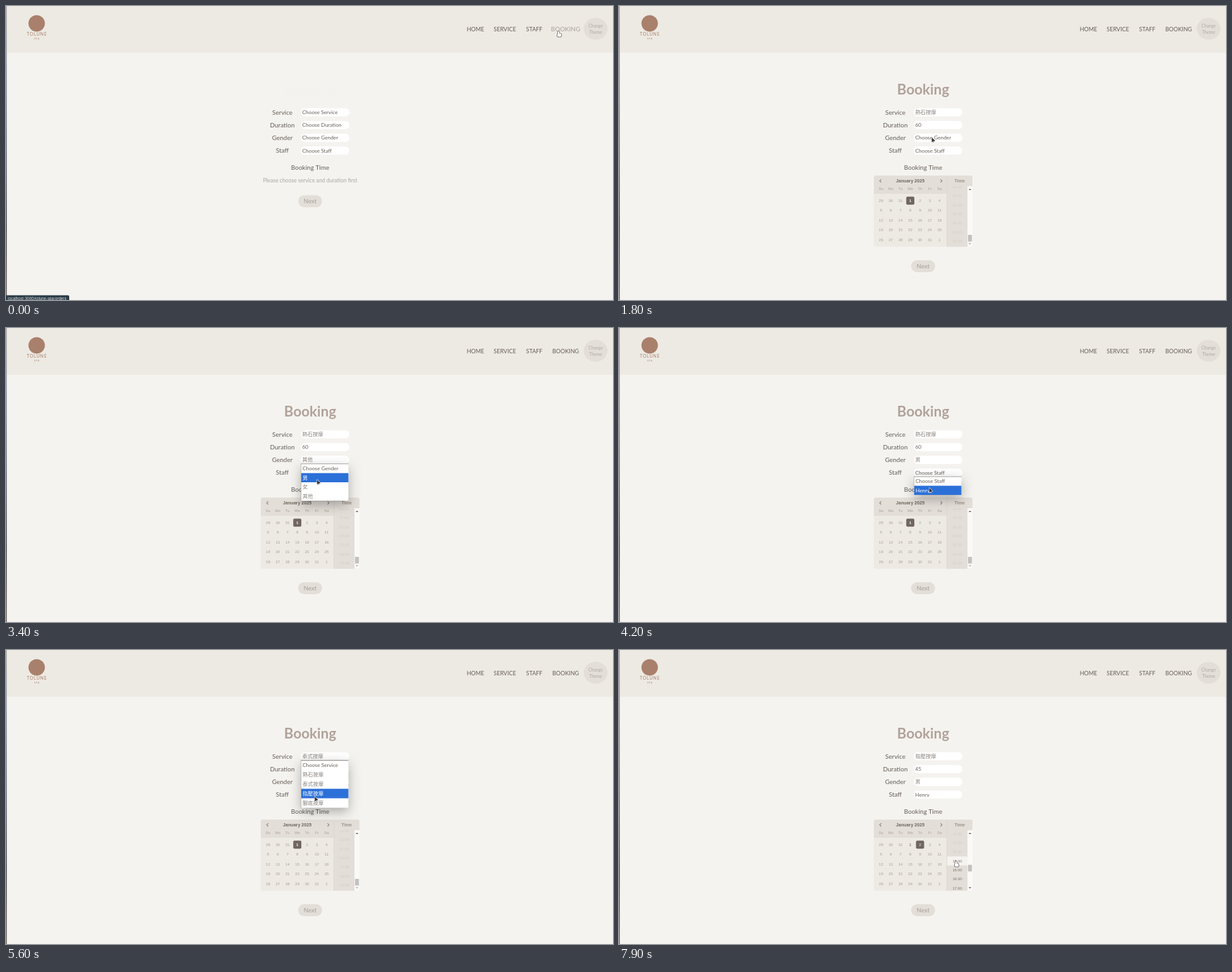
Write an HTML page with a canvas that moves like this. It is 960x465 px and loops after 8000 ms.

```html
<!DOCTYPE html>
<html lang="en">
<head>
<meta charset="utf-8">
<title>Booking</title>
<style>
html, body { margin: 0; width: 960px; height: 465px; overflow: hidden; background: #f5f3ef; }
canvas { display: block; }
</style>
</head>
<body>
<canvas id="stage" width="960" height="465"></canvas>
<script>
const ctx = document.getElementById('stage').getContext('2d');
const LOOP = 8000, TICK = 100, DATE_PICKED = 7100;
const UI = 'Lato, "Noto Sans CJK TC", "Noto Sans CJK JP", "Noto Sans CJK", sans-serif';
const CAL = '"Liberation Sans", Arial, sans-serif';
const PAGE = '#f5f3ef', BAND = '#edeae3', SAND = '#e3ded8', INK = '#655d57', BROWN = '#a9806c';
const MENU = { x: 467, w: 74.5 }, TIME_ROW = 14.35;

const names = ['Service', 'Duration', 'Gender', 'Staff'];
const fieldY = name => 168 + 20.2 * names.indexOf(name);
const rowHeight = name => name === 'Service' ? 15 : 14.5;
const menuTop = name => fieldY(name) + 6.5;
const dayX = col => 414.4 + 15.43 * col;
const dayY = row => 307.8 + 15.4 * row;

const services = ['熱石按摩', '泰式按摩', '指壓按摩', '腳底按摩'];
const durations = service => service === 3 ? ['45', '75', '90'] : ['60', '90', '120'];

// Each visit opens a menu and moves from one row to the row it picks.
const visits = [
  { name: 'Service', open: 400, close: 700, from: 0, pick: 1 },
  { name: 'Duration', open: 1000, close: 1400, from: 0, pick: 1 },
  { name: 'Gender', open: 1900, close: 2500, from: 0, pick: 3 },
  { name: 'Gender', open: 2900, close: 3700, from: 3, pick: 1 },
  { name: 'Staff', open: 4000, close: 4400, from: 0, pick: 1 },
  { name: 'Service', open: 4900, close: 5200, from: 1, pick: 2 },
  { name: 'Service', open: 5400, close: 5700, from: 2, pick: 3 },
  { name: 'Duration', open: 5900, close: 6400, from: 0, pick: 1 }
];

const clamp = (v, lo, hi) => Math.min(hi, Math.max(lo, v));
const ease = p => p * p * (3 - 2 * p);
const progress = (t, from, to) => ease(clamp((t - from) / (to - from), 0, 1));

function visitKeys({ name, open, close, from, pick }) {
  const overshoot = 0.35 * Math.sign(pick - from);
  const key = (t, y) => ({ t, x: 498 - t / 600, y });
  const rowY = row => menuTop(name) + rowHeight(name) * (row + 0.5);
  return [
    key(open - 100, fieldY(name)),
    key(open + 50, rowY(from - overshoot)),
    key(close - 100, rowY(pick + overshoot))
  ];
}

const path = [
  { t: 0, x: 874, y: 40 },
  { t: 100, x: 870, y: 44 },
  ...visits.flatMap(visitKeys),
  { t: 2700, x: 496, y: fieldY('Staff') - 3 },
  { t: 6500, x: 506, y: fieldY('Gender') },
  { t: 6700, x: 578, y: 262 },
  { t: 7000, x: dayX(4), y: dayY(0) - 2 },
  { t: DATE_PICKED, x: dayX(4), y: dayY(0) - 2 },
  { t: 7500, x: 533, y: 334 }
].sort((a, b) => a.t - b.t);

function pointerAt(t) {
  const next = path.findIndex(k => k.t > t);
  if (next < 0) return path[path.length - 1];
  const a = path[next - 1], b = path[next], p = progress(t, a.t, b.t);
  return { x: a.x + (b.x - a.x) * p, y: a.y + (b.y - a.y) * p };
}

function formAt(t) {
  const form = { Service: 0, Duration: 0, Gender: 0, Staff: 0 };
  for (const { name, close, pick } of visits) {
    if (close > t) break;
    if (name === 'Service' && String(durations(pick)) !== String(durations(form.Service))) form.Duration = 0;
    form[name] = pick;
  }
  return form;
}

function optionsOf(name, form) {
  const lists = { Service: services, Duration: durations(form.Service), Gender: ['男', '女', '其他'], Staff: ['Henry'] };
  return ['Choose ' + name, ...lists[name]];
}

function rect(x, y, w, h, color, radius = 0) {
  ctx.fillStyle = color;
  ctx.beginPath();
  ctx.roundRect(x, y, w, h, radius);
  ctx.fill();
}

function oval(x, y, rx, ry, color) {
  ctx.fillStyle = color;
  ctx.beginPath();
  ctx.ellipse(x, y, rx, ry, 0, 0, 7);
  ctx.fill();
}

// y is the middle of the capitals
function text(str, x, y, size, color, { align = 'center', weight = 400, family = UI } = {}) {
  ctx.font = `${weight} ${size}px ${family}`;
  ctx.textAlign = align;
  ctx.fillStyle = color;
  ctx.fillText(str, x, y + size * 0.36);
}

const optionText = (str, x, y, color) =>
  text(str, x, y, 8.3, color || (/\w/.test(str) ? INK : '#89837e'), { align: 'left' });

// Arrow tip of half-size s; dir is the direction along one axis
function chevron(x, y, s, dx, dy) {
  ctx.beginPath();
  ctx.moveTo(x - s * (dx + dy) / 2, y - s * (dy + dx) / 2 * 1 - (dx ? s * (1 - dx / 2) - s * 0.5 * dx * 0 - s * 0.0 : 0) + (dx ? s * 0 : 0));
}

function angle(x, y, size, turn) {
  ctx.save();
  ctx.translate(x, y);
  ctx.rotate(turn);
  ctx.beginPath();
  ctx.moveTo(-size, size / 2);
  ctx.lineTo(0, -size / 2);
  ctx.lineTo(size, size / 2);
  ctx.restore();
}

function drawHeader(t) {
  rect(0, 0, 960, 74, BAND);
  oval(48.5, 27.5, 13, 13, BROWN);
  ctx.letterSpacing = '1px';
  text('TOLUNE', 49, 44.7, 6.6, BROWN);
  text('SPA', 49, 51.3, 3.4, BROWN);
  ctx.letterSpacing = '0px';

  const hover = t < 200;
  text('HOME', 742.5, 36.5, 9, INK);
  text('SERVICE', 789, 36.5, 9, INK);
  text('STAFF', 835.5, 36.5, 9, INK);
  text('BOOKING', 885, 36.5, hover ? 9.9 : 9, hover ? '#aaa19b' : INK);

  oval(932.5, 36, 18.8, 17.3, SAND);
  text('Change', 932.5, 31.7, 6.8, '#b3a8a2');
  text('Theme', 932.5, 41.2, 6.8, '#b3a8a2');
}

function drawEdge() {
  const g = ctx.createLinearGradient(0, 0, 0, 465);
  ['#a3a3a5', '#7f899c', '#5f6570', '#36383f', '#6a5a52'].forEach((c, i) => g.addColorStop(i / 4, c));
  rect(0, 0, 1.2, 465, g);
}

function drawHeading(t) {
  const p = 1 - (1 - Math.min(1, t / 800)) ** 2;
  ctx.globalAlpha = 0.01 + 0.99 * p;
  text('Booking', 481, 137.5 - 6 * p, 22.4, '#b0a29a', { weight: 700 });
  ctx.globalAlpha = 1;
}

function drawFields(form) {
  for (const name of names) {
    const y = fieldY(name);
    text(name, 437, y, 10, INK);
    rect(466, y - 6.3, 77, 12.8, '#fff', 6.4);
    optionText(optionsOf(name, form)[form[name]], 468.5, y);
  }
  text('Booking Time', 481, 255.7, 10, INK);
}

function drawNext(y) {
  rect(462, y, 38, 19, SAND, 9.5);
  text('Next', 481, y + 9.7, 9.6, '#a89f98');
}

function drawTimes(t) {
  const scroll = 191 * progress(t, 7300, 7800), pointer = pointerAt(t);
  rect(518.8, 285, 32.4, 96, SAND);
  ctx.save();
  ctx.beginPath();
  ctx.rect(518.8, 285, 32.4, 95.5);
  ctx.clip();
  for (let i = 0; i < 48; i++) {
    const y = 372 - (47 - i) * TIME_ROW + scroll;
    const open = t >= DATE_PICKED && i >= 31 && i <= 40;
    const hover = open && pointer.x > 519 && Math.abs(pointer.y - y) < TIME_ROW / 2;
    if (hover) rect(518.8, y - 7, 32.4, 14.3, PAGE);
    const label = String(i >> 1).padStart(2, '0') + (i % 2 ? ':30' : ':00');
    text(label, 535, y, 6, open ? '#7d746d' : '#d4cdc6', { family: CAL });
  }
  ctx.restore();
  rect(551.2, 285, 7.8, 96, '#faf9f8');
  rect(552, 362 - scroll * 0.1165, 6.2, 10.5, '#c3c2c1');
  ctx.fillStyle = '#56524f';
  angle(555.1, 290, 2.1, 0);
  ctx.fill();
  ctx.fillStyle = scroll ? '#56524f' : '#a9a6a3';
  angle(555.1, 376.3, 2.1, Math.PI);
  ctx.fill();
}

function drawDays(t) {
  const chosen = t < DATE_PICKED ? 1 : 2;
  for (let i = 0; i < 35; i++) {
    const x = dayX(i % 7), y = dayY(Math.floor(i / 7)), day = i - 2;
    const today = day === 1, picked = day === chosen;
    if (picked) rect(x - 6.4, y - 6.4, 12.8, 12.8, '#70665f', 2);
    const color = picked ? '#fff' : today ? '#847a73' : '#a59c95';
    text((day + 30) % 31 + 1, x, y, 6, color, { weight: today ? 700 : 400, family: CAL });
  }
}

function drawCalendar(t) {
  ctx.save();
  ctx.beginPath();
  ctx.roundRect(403, 268.3, 156, 112.5, 3);
  ctx.clip();
  rect(403, 268, 156, 113, BAND);
  rect(403, 268, 156, 17, SAND);
  rect(403, 285, 115.5, 12, SAND);
  drawTimes(t);
  rect(518.2, 268, 0.7, 113, '#d9d3cc');
  ctx.restore();

  const bold = { weight: 700, family: CAL };
  text('January 2025', 460.6, 276.6, 7.1, '#6f665f', bold);
  text('Time', 538.8, 276.6, 7.1, '#9c928b', bold);
  ctx.strokeStyle = '#8d837c';
  ctx.lineWidth = 1.1;
  for (const side of [-1, 1]) {
    angle(461.6 + side * 48.1, 276.6, 2.4, side * Math.PI / 2);
    ctx.stroke();
  }
  ['Su', 'Mo', 'Tu', 'We', 'Th', 'Fr', 'Sa'].forEach((d, i) => text(d, dayX(i), 288.7, 6, '#aaa19a', { family: CAL }));
  drawDays(t);
}

function drawMenu(t, form) {
  const visit = visits.find(v => t >= v.open && t < v.close);
  if (!visit) return;
  const { name, from, pick } = visit, options = optionsOf(name, form);
  const top = menuTop(name), rowH = rowHeight(name);
  const row = Math.round((pointerAt(t).y - top) / rowH - 0.5);
  const active = clamp(row, Math.min(from, pick), Math.max(from, pick));

  ctx.save();
  ctx.shadowColor = 'rgba(0,0,0,.3)';
  ctx.shadowBlur = 18;
  ctx.shadowOffsetY = 6;
  rect(MENU.x, top, MENU.w, rowH * options.length, '#fff', 1.5);
  ctx.restore();
  rect(MENU.x - 0.5, top - 0.4, MENU.w + 0.5, 0.8, '#8a8683');
  rect(MENU.x - 0.5, top, 0.6, rowH * options.length, '#a9a7a5');
  options.forEach((str, i) => {
    const y = top + rowH * i;
    if (i === active) rect(MENU.x, y, MENU.w, rowH, '#2b70d8');
    optionText(str, 469, y + rowH / 2, i === active && '#fff');
  });
}

function drawHand() {
  const finger = new Path2D(), palm = new Path2D();
  finger.roundRect(-1.1, 0, 2.2, 6, 1.1);
  palm.roundRect(-2.2, 3.6, 6.6, 5.2, 2);
  ctx.strokeStyle = '#55504d';
  ctx.lineWidth = 1.4;
  ctx.fillStyle = '#fff';
  [finger, palm].forEach(p => ctx.stroke(p));
  [finger, palm].forEach(p => ctx.fill(p));
}

function drawArrow() {
  ctx.beginPath();
  ctx.moveTo(0, 0);
  ctx.lineTo(0, 6.8);
  ctx.lineTo(1.9, 5.2);
  ctx.lineTo(4.7, 4.9);
  ctx.closePath();
  ctx.moveTo(1.6, 4.8);
  ctx.lineTo(2.9, 7.6);
  ctx.lineJoin = 'round';
  ctx.strokeStyle = '#fff';
  ctx.lineWidth = 1.8;
  ctx.stroke();
  ctx.strokeStyle = ctx.fillStyle = '#333';
  ctx.lineWidth = 0.7;
  ctx.stroke();
  ctx.fill();
}

function drawPointer(t) {
  const { x, y } = pointerAt(t);
  ctx.save();
  ctx.translate(x, y);
  if (t < 200 || t >= 7000) drawHand();
  else drawArrow();
  ctx.restore();
}

function drawStatus() {
  rect(0, 457.4, 100, 10, '#2c3d47', [0, 2, 0, 0]);
  text('localhost:3000/tolune-spa/orders', 3, 462.8, 5.8, '#e4e9ec', { align: 'left', family: 'Inter, sans-serif' });
}

function draw(t) {
  const form = formAt(t);
  rect(0, 0, 960, 465, PAGE);
  drawHeader(t);
  drawEdge();
  drawHeading(t);
  drawFields(form);
  if (form.Duration) {
    drawCalendar(t);
    drawNext(402);
  } else {
    text('Please choose service and duration first', 481, 275.7, 8.6, '#aca6a1');
    drawNext(299.3);
  }
  drawMenu(t, form);
  if (t < 300) drawStatus();
  drawPointer(t);
}

const start = performance.now();
function frame(now) {
  const t = Math.max(0, now - start) % LOOP;
  draw(Math.floor(t / TICK) * TICK);
  requestAnimationFrame(frame);
}
draw(0);
requestAnimationFrame(frame);
</script>
</body>
</html>
```
